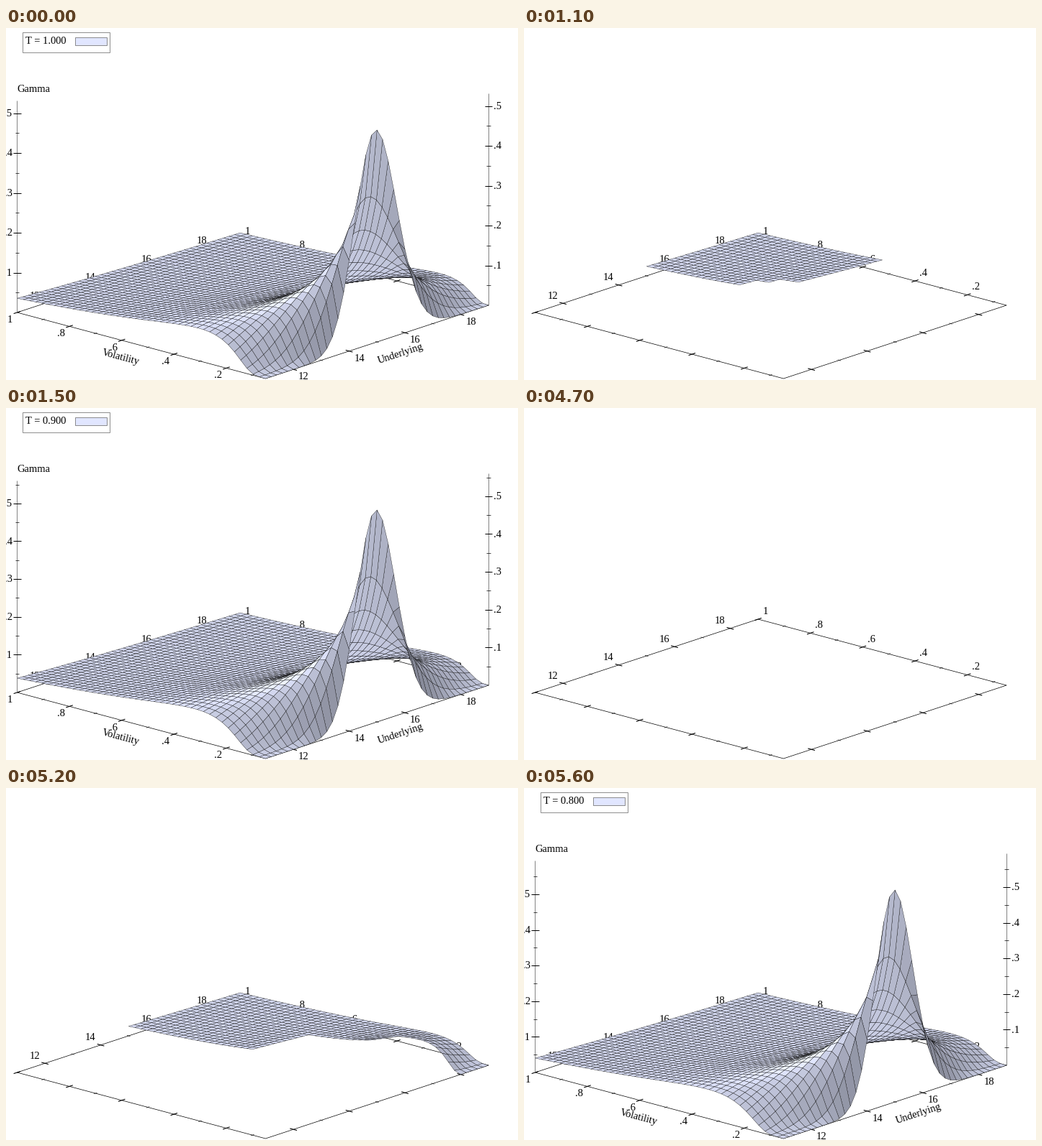
A matplotlib script for the animation above (8 s loop, 711 px wide and 490 px high).

```python
import numpy as np
import matplotlib.pyplot as plt
from matplotlib.animation import FuncAnimation
from matplotlib.collections import LineCollection, PolyCollection
from matplotlib.patches import Rectangle

W, H, DPI = 711, 490, 64
PT = 72 / DPI                      # points per pixel
N = 40                             # surface cells per side
STRIKE, S_MIN, S_MAX, V_MIN, V_MAX = 15, 11, 19, 0.05, 1.0
LEFT = np.array([15.8, 395.8])     # corner at lowest underlying, highest volatility
S_AXIS = np.array([309.7, -102.0])
V_AXIS = np.array([345.0, 92.0])
HEIGHT, BOX_RATIO = 295, 0.666
BASE_COLOR = np.array([225, 230, 255]) / 255
LIGHT = np.array([-0.3, -0.4, 0.87])

plt.rcParams["font.family"] = "Liberation Serif"
fig = plt.figure(figsize=(W / DPI, H / DPI), dpi=DPI, facecolor="white")
ax = fig.add_axes([0, 0, 1, 1])
ax.set(xlim=(0.4, W + 0.4), ylim=(H - 0.2, -0.2))
ax.axis("off")


def floor_point(s, v):
    return (LEFT + (s - S_MIN) / (S_MAX - S_MIN) * S_AXIS
            + (V_MAX - v) / (V_MAX - V_MIN) * V_AXIS)


def gamma(s, v, t):
    dev = v * np.sqrt(t)
    d1 = np.log(s / STRIKE) / dev + dev / 2
    return np.exp(-d1 ** 2 / 2) / (np.sqrt(2 * np.pi) * s * dev)


def top_value(t):
    return gamma(STRIKE, V_MIN, t)


def text(x, y, label, ha="left", z=3, **kw):
    return ax.text(x, y + 4.8, label, ha=ha, va="baseline",
                   fontsize=14.5 * PT, zorder=z, **kw)


def lines(segments, width, color="black", z=1):
    return ax.add_collection(LineCollection(
        segments, linewidths=width * PT, colors=color, zorder=z))


def short(value):
    return f"{value:.1f}".lstrip("0") if value < 0.99 else "1"


def draw_order(i0, i1, j0, j1):
    """Visit cells back, right, left, front, splitting into quadrants."""
    if i0 >= i1 or j0 >= j1:
        return
    if i1 - i0 == 1 and j1 - j0 == 1:
        yield i0, j0
        return
    im, jm = (i0 + i1) // 2, (j0 + j1) // 2
    if i1 - i0 == 1:
        im = i1
    if j1 - j0 == 1:
        jm = j1
    yield from draw_order(i0, im, j0, jm)
    yield from draw_order(i0, im, jm, j1)
    yield from draw_order(im, i1, j0, jm)
    yield from draw_order(im, i1, jm, j1)


ORDER = list(draw_order(0, N, 0, N))


def build_surface(t):
    s = np.linspace(S_MAX, S_MIN, N + 1)[:, None]
    v = np.linspace(V_MAX, V_MIN, N + 1)[None, :]
    z = gamma(s, v, t) / top_value(t)
    a = (s - S_MIN) / (S_MAX - S_MIN)
    b = (V_MAX - v) / (V_MAX - V_MIN)
    x = LEFT[0] + a * S_AXIS[0] + b * V_AXIS[0]
    y = LEFT[1] + a * S_AXIS[1] + b * V_AXIS[1] - z * HEIGHT
    polys, colors = [], []
    for i, j in ORDER:
        corners = [(i, j), (i + 1, j), (i + 1, j + 1), (i, j + 1)]
        polys.append([(x[c], y[c]) for c in corners])
        q = [z[c] * BOX_RATIO * N / 2 for c in corners]
        normal = np.array([q[1] + q[2] - q[0] - q[3],
                           q[0] + q[1] - q[2] - q[3], 1])
        d = normal @ LIGHT / np.linalg.norm(normal)
        shade = 0.66 + 0.28 * d + max(0, d - 0.85)
        colors.append(np.clip(BASE_COLOR * shade, 0, 1))
    return polys, np.array(colors)


def draw_floor():
    corners = [floor_point(s, v) for s, v in
               [(S_MIN, V_MAX), (S_MAX, V_MAX), (S_MAX, V_MIN), (S_MIN, V_MIN)]]
    lines([corners + corners[:1]], 0.7)
    along_s = S_AXIS / np.hypot(*S_AXIS)
    along_v = V_AXIS / np.hypot(*V_AXIS)
    ticks = {True: [], False: []}

    def tick(point, direction, major):
        half = direction * (5 if major else 2.4)
        ticks[major].append([point - half, point + half])

    for s in range(12, 19):
        for v in (V_MIN, V_MAX):
            tick(floor_point(s, v), along_v, s % 2 == 0)
    for k in range(1, 11):
        for s in (S_MIN, S_MAX):
            tick(floor_point(s, k / 10), along_s, k % 2 == 0)
    lines(ticks[True], 1.1)
    lines(ticks[False], 0.6)

    for s in range(12, 19, 2):
        x, y = floor_point(s, V_MAX)
        text(x - 7, y - 11.5, str(s), "right", z=1)
    for k in range(2, 11, 2):
        x, y = floor_point(S_MAX, k / 10)
        text(x + 6.5, y - 12, short(k / 10), z=1)


def front_labels():
    items = []
    for s in range(12, 19, 2):
        x, y = floor_point(s, V_MIN)
        items.append(text(x + 7, y + 9, str(s)))
    for k in range(2, 11, 2):
        x, y = floor_point(S_MIN, k / 10)
        items.append(text(x - 6, y + 9, short(k / 10), "right"))
    items.append(text(158.5, 456.8, "Volatility", "center",
                      rotation=-14.9, rotation_mode="anchor"))
    items.append(text(549.5, 452.2, "Underlying", "center",
                      rotation=18.2, rotation_mode="anchor"))
    items.append(text(16, 84, "Gamma"))
    for x, y, w, h, fill in [(23, 6, 121, 28, "white"),
                             (96, 13, 44, 11, BASE_COLOR)]:
        items.append(ax.add_patch(Rectangle(
            (x, y), w, h, fc=fill, ec="0.45", lw=0.8 * PT, zorder=3)))
    return items


def height_axes(t):
    """Vertical axes and the legend text for one time to expiry."""
    items = [text(27, 17, f"T = {t:.3f}", z=4)]
    top = top_value(t)
    for corner, right in [(floor_point(S_MIN, V_MAX), False),
                          (floor_point(S_MAX, V_MIN), True)]:
        x, y0 = corner
        major, minor = [], []
        for k in range(1, int(top / 0.05) + 1):
            y = y0 - k * 0.05 / top * HEIGHT
            half = 2.7 if k % 2 else 5.2
            (minor if k % 2 else major).append([(x - half, y), (x + half, y)])
            if k % 2 == 0:
                label = short(k * 0.05)
                items.append(text(x + 6.8, y - 0.5, label) if right
                             else text(x - 6.8, y - 0.5, label, "right"))
        items.append(lines([[(x, y0), (x, y0 - HEIGHT)]], 0.8, "0.4", 3))
        items.append(lines(major, 1.0, z=3))
        items.append(lines(minor, 0.7, z=3))
    return items


def state(k):
    """Expiry and number of cells drawn at tick k of 100 ms."""
    full = N * N
    if k < 5:
        return 1.0, full
    if k < 15:
        return 0.9, max(0, int(379.7 * (k - 10)))
    if k < 47:
        return 0.9, full
    if k < 56:
        return 0.8, max(0, 275 * (k - 50))
    return 0.8, full


TIMES = (1.0, 0.9, 0.8)
draw_floor()
surfaces = {t: build_surface(t) for t in TIMES}
axes_items = {t: height_axes(t) for t in TIMES}
labels = front_labels()
# Neighbouring cells share edges, so each edge is stroked twice.
mesh = ax.add_collection(PolyCollection(
    [], edgecolors="black", linewidths=0.34 * PT, zorder=2))


def update(k):
    t, count = state(k)
    polys, colors = surfaces[t]
    mesh.set_verts(polys[:count])
    mesh.set_facecolor(colors[:count])
    mesh.set_visible(count > 0)
    done = count == N * N
    for item in labels:
        item.set_visible(done)
    for time, items in axes_items.items():
        for item in items:
            item.set_visible(done and time == t)
    return []


anim = FuncAnimation(fig, update, frames=80, interval=100,
                     init_func=lambda: update(0), repeat=True,
                     repeat_delay=0, blit=False)
plt.show()
```
